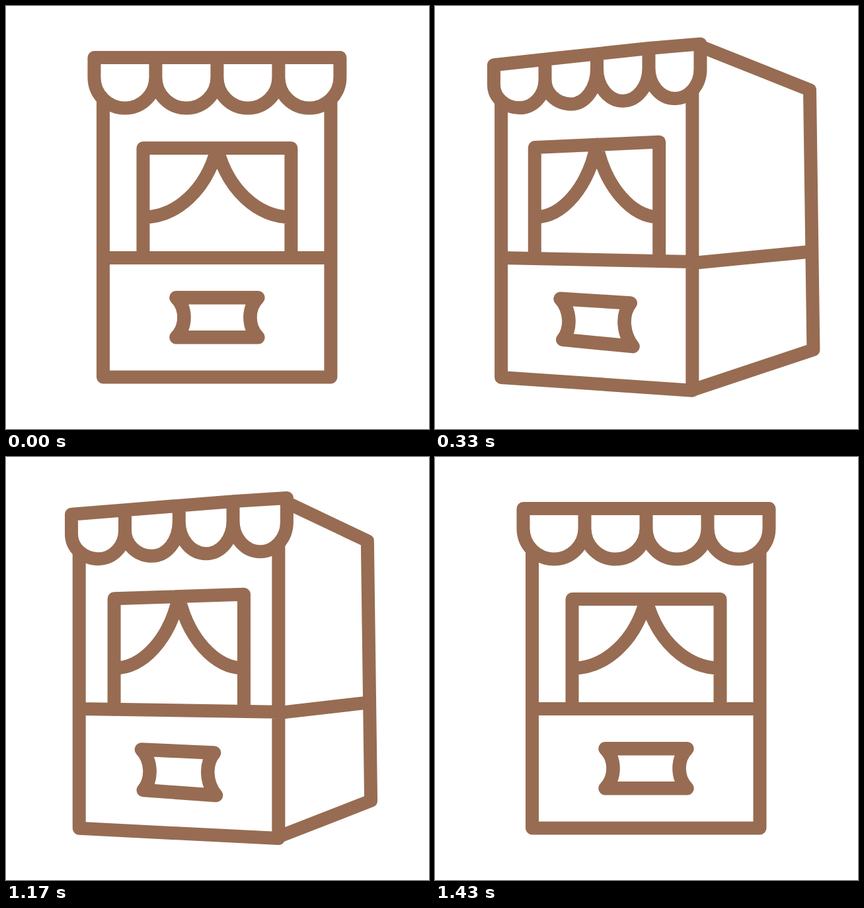
Recreate the animation shown at these times as an HTML page. Size 640 by 640 pixels, loop 1.67 s.

```html
<!DOCTYPE html>
<html lang="en">
<head>
<meta charset="utf-8">
<title>Ticket booth</title>
<style>
  html, body { margin: 0; height: 100%; overflow: hidden; background: #fff; }
  svg { display: block; width: 100vw; height: 100vh; }
  path { fill: none; stroke: #976c52; stroke-width: 20; stroke-linecap: round; stroke-linejoin: round; }
  #wall { fill: #fff; stroke: none; }
  #ticket { stroke-width: 20.6; }
</style>
</head>
<body>
<svg viewBox="0 0 640 640">
  <clipPath id="clip"><rect id="clipRect" height="640"/></clipPath>
  <g clip-path="url(#clip)"><path id="side"/></g>
  <path id="wall"/>
  <path id="awning"/>
  <path id="frame"/>
  <path id="window"/>
  <path id="ticket"/>
</svg>
<script>
const LOOP = 1670, FRAME = 1000 / 30, TURN = 416.7;
const byId = id => document.getElementById(id);

// Awning with four scallops hanging between five dividers.
function awning(xs, tops, joints, bottoms) {
  const k = 0.552;
  let d = xs.map((x, i) => `${i ? 'L' : 'M'}${x} ${tops[i]}`).join('');
  xs.forEach((x, i) => d += `M${x} ${tops[i]}L${x} ${joints[i]}`);
  bottoms.forEach((b, i) => {
    const l = xs[i], r = xs[i + 1], jl = joints[i], jr = joints[i + 1];
    const m = (l + r) / 2, h = (r - l) / 2 * k;
    d += `M${l} ${jl}C${l} ${jl + k * (b - jl)} ${m - h} ${b} ${m} ${b}`
       + `C${m + h} ${b} ${r} ${jr + k * (b - jr)} ${r} ${jr}`;
  });
  return d;
}

// Each part has two poses with the same commands: facing front, and turned.
const parts = {
  side: [
    'M491.5 90L477.5 127L482 520L491.5 552M491.5 381L478.5 371',
    'M394 58.5L573 127L578.5 520L382.5 583M382.5 389.5L575.5 371.5'],
  wall: [
    'M133.5 78L505.5 78L505.5 108L491.5 141L491.5 561.5L147 561.5L147 141L133.5 108Z',
    'M86 90L394.5 56L394.5 95L382.5 126L382.5 583L97 562L97 146L86 120Z'],
  awning: [
    awning([133.5, 226.5, 319.5, 412.5, 505.5], [78, 78, 78, 78, 78],
           [108, 108, 108, 108, 108], [154.5, 154.5, 154.5, 154.5]),
    awning([86, 162.5, 240, 317.5, 394.5], [90, 81, 72, 63, 56],
           [120, 112, 94, 93, 95], [154, 148, 143, 139])],
  frame: [
    'M147 143L147 561.5L491.5 561.5L491.5 143M147 381L491.5 381',
    'M97 148L97 562L382.5 583L382.5 128M97 381L382.5 387.5'],
  window: [
    'M207.5 381L207.5 215L431.5 215L431.5 381'
      + 'M319.5 215C303.5 278 258 319.5 207.5 319.5M319.5 215C335.5 278 381 319.5 431.5 319.5',
    'M147 382L147 214L333 205L333 386'
      + 'M239.5 209.5C227 273 189 319.5 147 319.5M239.5 209.5C252 271 291 319.5 333 319.5'],
  ticket: [
    'M257.5 441.3L381.5 441.3C365.5 457 365.5 485 381.5 501.3L257.5 501.3C273.5 485 273.5 457 257.5 441.3Z',
    'M185 443L290 450C276 468 279 497 294 516L189 505C202 489 201 461 185 443Z'],
};

function blend(front, turned, p) {
  const ends = turned.match(/[\d.]+/g);
  let i = 0;
  return front.replace(/[\d.]+/g, a => (+a + (ends[i++] - a) * p).toFixed(2));
}

// Ease in and out: cubic Bezier (0.42, 0, 0.58, 1).
function ease(x) {
  if (x <= 0) return 0;
  if (x >= 1) return 1;
  let lo = 0, hi = 1;
  for (let i = 0; i < 24; i++) {
    const t = (lo + hi) / 2, u = 1 - t;
    if (1.26 * u * u * t + 1.74 * u * t * t + t * t * t < x) lo = t; else hi = t;
  }
  return lo * lo * (3 - 2 * lo);
}

function draw(now) {
  const ms = Math.floor((now % LOOP + 3.4) / FRAME) * FRAME;
  const p = ms < 700 ? ease((ms + 10) / TURN) : 1 - ease((ms - 1015.6) / TURN);
  for (const id in parts) byId(id).setAttribute('d', blend(...parts[id], p));
  byId('clipRect').setAttribute('width', 484 + 111 * p);
}

let start;
function tick(now) {
  start ??= now;
  draw(now - start);
  requestAnimationFrame(tick);
}
draw(0);
requestAnimationFrame(tick);
</script>
</body>
</html>
```
